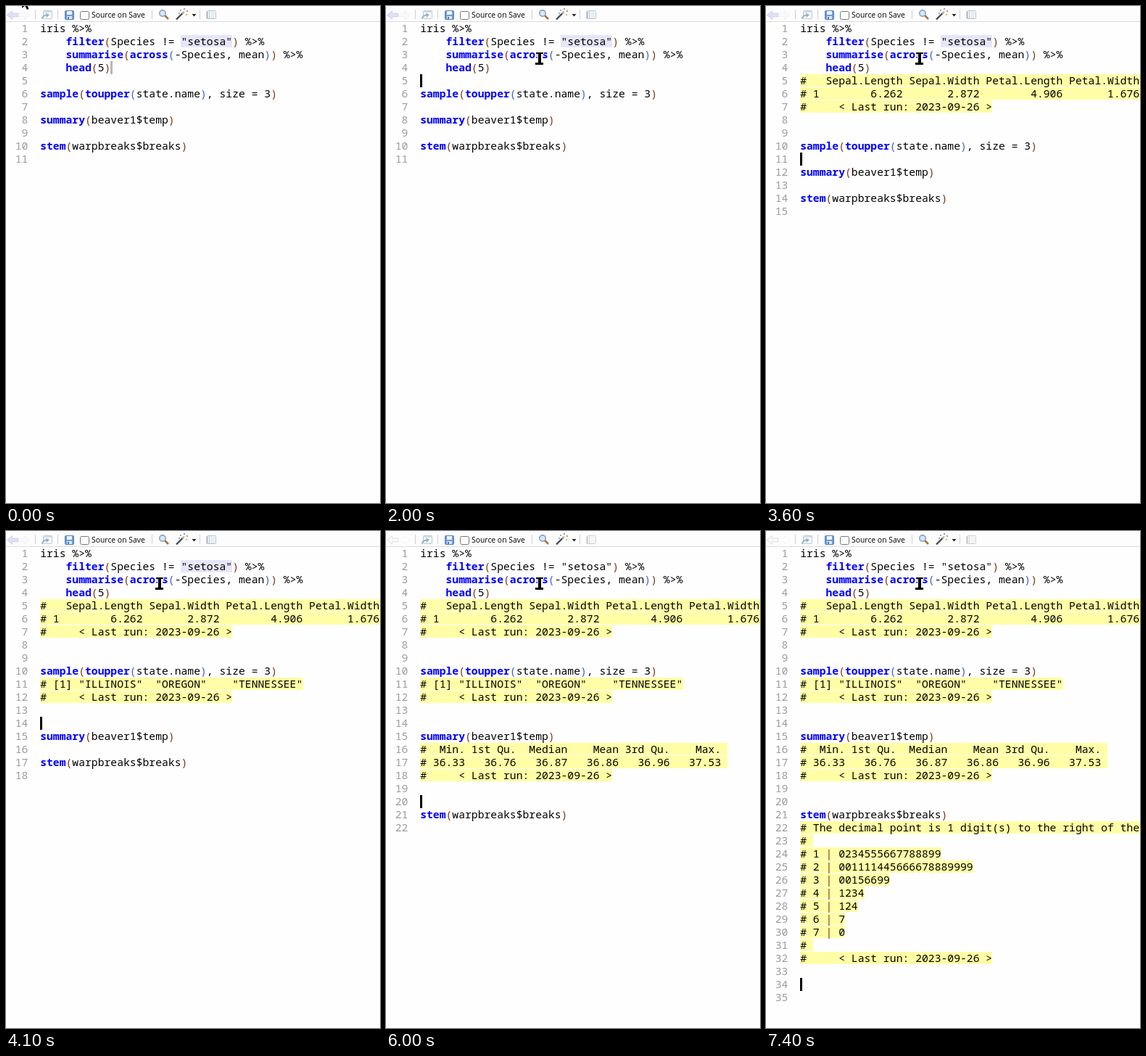
An HTML page with a canvas that plays this animation: 516 by 685 pixels, repeating every 8 s.

```html
<!DOCTYPE html>
<html>
<head>
<meta charset="utf-8">
<style>
html, body { margin: 0; width: 516px; height: 685px; overflow: hidden; background: #fefefe; }
canvas { display: block; }
</style>
</head>
<body>
<canvas id="stage" width="516" height="685"></canvas>
<script>
const ctx = document.getElementById('stage').getContext('2d', { alpha: false });
const LOOP = 8000, TOP = 22, ROW = 18, LEFT = 47.2, CHAR = 8.832;
const MONO = '14.72px "Noto Sans Mono", "DejaVu Sans Mono", monospace';
const STAMP = '#     < Last run: 2023-09-26 >';

// Each block of code is followed by its output once it has been run.
const blocks = [
  { at: 2500,
    code: ['iris %>%', '    filter(Species != "setosa") %>%',
      '    summarise(across(-Species, mean)) %>%', '    head(5)'],
    out: ['#   Sepal.Length Sepal.Width Petal.Length Petal.Width',
      '# 1        6.262       2.872        4.906       1.676', STAMP, ''] },
  { at: 4100,
    code: ['sample(toupper(state.name), size = 3)'],
    out: ['# [1] "ILLINOIS"  "OREGON"    "TENNESSEE"', STAMP, ''] },
  { at: 6000,
    code: ['summary(beaver1$temp)'],
    out: ['#  Min. 1st Qu.  Median    Mean 3rd Qu.    Max. ',
      '# 36.33   36.76   36.87   36.86   36.96   37.53 ', STAMP, ''] },
  { at: 7300,
    code: ['stem(warpbreaks$breaks)'],
    out: ['# The decimal point is 1 digit(s) to the right of the |', '# ',
      '# 1 | 0234555667788899', '# 2 | 001111445666678889999', '# 3 | 00156699',
      '# 4 | 1234', '# 5 | 124', '# 6 | 7', '# 7 | 0', '# ', STAMP, '', ''] }
];

// Caret: time, row (0 = hidden)
const carets = [[0, 4], [1600, 6], [2000, 5], [2500, 9], [2800, 10], [3300, 12], [3600, 11],
  [4100, 14], [4400, 15], [5000, 17], [5400, 16], [6000, 20], [6300, 21], [6700, 0], [7300, 34]];

// Pointer: time, x, y
const moves = [[0, 22, -14], [300, 92, 32], [600, 178, 79], [700, 181, 80], [900, 184, 79], [1600, 211, 72]];

function rect(x, y, w, h, color) {
  ctx.fillStyle = color;
  ctx.fillRect(x, y, w, h);
}

function path(points, fill, stroke, width = 1) {
  ctx.beginPath();
  points.forEach(([x, y], i) => i ? ctx.lineTo(x, y) : ctx.moveTo(x, y));
  if (fill) {
    ctx.closePath();
    ctx.fillStyle = fill;
  }
  if (stroke) {
    ctx.strokeStyle = stroke;
    ctx.lineWidth = width;
    ctx.stroke();
  }
  if (fill) ctx.fill();
}

function box(x, y, w, h, fill, stroke, r = 0) {
  ctx.beginPath();
  ctx.roundRect(x + .5, y + .5, w - 1, h - 1, r);
  ctx.fillStyle = fill;
  ctx.fill();
  ctx.strokeStyle = stroke;
  ctx.lineWidth = 1;
  ctx.stroke();
}

function text(s, col, row, color, bold) {
  ctx.font = (bold ? 'bold ' : '') + MONO;
  ctx.fillStyle = color;
  ctx.fillText(s, LEFT + col * CHAR, TOP + ROW * row - 4);
}

function navArrow(x, dir, fill, stroke) {
  const shape = [[0, 12.5], [6, 7.5], [6, 10.5], [14, 10.5], [14, 14.5], [6, 14.5], [6, 17.5]];
  path(shape.map(([a, b]) => [x + dir * a, b]), fill, stroke, 1.5);
}

function toolbar(faded) {
  rect(0, 0, 516, 21, '#fdfdfe');
  rect(0, 21, 516, 1, '#d9dce2');
  navArrow(2, 1, faded ? '#fafafa' : '#dfe1f6', faded ? '#d6d6d6' : '#c3c9ea');
  navArrow(32, -1, faded ? '#fefefe' : '#fafafc', faded ? '#f5f5f5' : '#eeeef2');
  for (const x of [40, 71, 201, 267]) rect(x, 5, 1, 13, '#cfcfcf');

  box(51, 6, 13, 12, '#f8fbfd', '#b9c8d2', 1);
  rect(52, 7, 11, 2, '#d3dfe7');
  path([[49.5, 17.5], [52, 13.5], [56, 12.5]], null, '#8fb4c8', 2);
  path([[55, 9.5], [60, 12], [56, 16]], '#8fb4c8');

  box(81, 6, 13, 13, '#6f9bd3', '#5681bd', 1);
  rect(84, 7, 7, 5, '#eef4fb');
  rect(84, 14, 7, 4, '#dce8f5');
  rect(85, 15, 2, 3, '#5681bd');

  box(102, 7, 13, 12, '#fff', '#777', 2);
  ctx.font = '10.4px "Open Sans", "Noto Sans", sans-serif';
  ctx.fillStyle = '#000';
  ctx.fillText('Source on Save', 118, 16);

  path([[219, 13], [224, 18]], null, '#a8713f', 2.5);
  ctx.beginPath();
  ctx.arc(216, 10, 4.2, 0, 7);
  ctx.fillStyle = '#d5e8f8';
  ctx.fill();
  ctx.strokeStyle = '#7c99b8';
  ctx.lineWidth = 1.4;
  ctx.stroke();

  path([[235, 18.5], [245, 8.5]], null, '#4a4a55', 2.4);
  path([[243, 10.5], [246, 7.5]], null, '#b9bcc8', 2);
  [[240, 5, '#e6a04a'], [245, 3, '#7aa5dc'], [249, 6, '#e08a5a'], [248, 11, '#e6b45a'], [238, 9, '#8fb0e0']]
    .forEach(([x, y, c]) => rect(x, y, 2, 2, c));
  path([[256.5, 11], [262.5, 11], [259.5, 14.5]], '#222');

  const ink = faded ? '#d0d0d0' : '#b4c4cf';
  box(277, 6, 13, 12, '#fdfdfd', ink, 1);
  rect(280, 7, 1, 10, ink);
  for (let y = 8; y < 17; y += 2) {
    rect(276, y, 3, 1, faded ? '#bbb' : '#9aa9b5');
    rect(282, y, 6, 1, faded ? '#ececec' : '#d3e0e8');
  }
}

function codeLine(line, row) {
  let depth = 0;
  for (const m of line.matchAll(/\w+(?=\()|[()]|[^()\s]+?(?=\w+\(|[()\s]|$)/g)) {
    const s = m[0];
    let color = '#000', bold = false;
    if (s === '(') color = ++depth > 1 ? '#4060d0' : '#7b3a18';
    else if (s === ')') color = depth-- > 1 ? '#4060d0' : '#7b3a18';
    else if (line[m.index + s.length] === '(') [color, bold] = ['#0000ff', true];
    text(s, m.index, row, color, bold);
  }
}

function outputLine(line, row) {
  // Highlights stop one pixel short of the next row.
  rect(47, TOP + ROW * (row - 1), Math.ceil(line.length * CHAR), ROW - 1, '#fffea6');
  const bar = /^# \d \|/.test(line);
  text(bar ? line.replace('|', ' ') : line, 0, row, '#000');
  if (bar) text('|', 4, row, '#7b2a10');
}

function editor(t) {
  if (t < 6000) rect(241, 40, 71, ROW - 1, '#e6e6fa');
  if (t >= 600 && t < 1600) rect(118, 76, 9, ROW - 1, '#ebebf3');
  let row = 0;
  for (const { at, code, out } of blocks) {
    code.forEach(line => codeLine(line, ++row));
    if (t >= at) out.forEach(line => outputLine(line, ++row));
    row++;
  }
  ctx.textAlign = 'right';
  for (let n = 1; n <= row; n++) text(n, -1.9, n, '#9c9c9c');
  ctx.textAlign = 'left';
}

function caret(t) {
  const row = carets.findLast(c => c[0] <= t)[1];
  if (!row) return;
  const x = row === 4 ? 144 : 47;
  rect(x, TOP + ROW * (row - 1), 3, ROW, t < 600 ? '#b8b8b8' : '#000');
}

function pointer(t) {
  const i = moves.findLastIndex(m => m[0] <= t);
  const a = moves[i], b = moves[i + 1] || a;
  const k = b === a ? 0 : (t - a[0]) / (b[0] - a[0]);
  const x = Math.round(a[1] + (b[1] - a[1]) * k), y = Math.round(a[2] + (b[2] - a[2]) * k);
  if (y < 20) {
    const shape = [[0, 0], [0, 17], [4, 13.5], [7, 19], [9.5, 18], [7, 12], [12, 12]];
    path(shape.map(([u, v]) => [x + u, y + v]), '#000', '#fff', 2);
    return;
  }
  const bars = [[-4, -8, 10, 2], [-1, -8, 4, 17], [-5, 6, 11, 3]];
  for (const [u, v, w, h] of bars) rect(x + u - 1, y + v - 1, w + 2, h + 2, '#fff');
  for (const [u, v, w, h] of bars) rect(x + u, y + v, w, h, '#000');
}

function draw(now) {
  const t = Math.floor(now % LOOP / 100) * 100;
  rect(0, 0, 516, 685, '#fefefe');
  toolbar(t >= 6000);
  editor(t);
  caret(t);
  pointer(t);
  requestAnimationFrame(draw);
}
requestAnimationFrame(draw);
</script>
</body>
</html>
```
